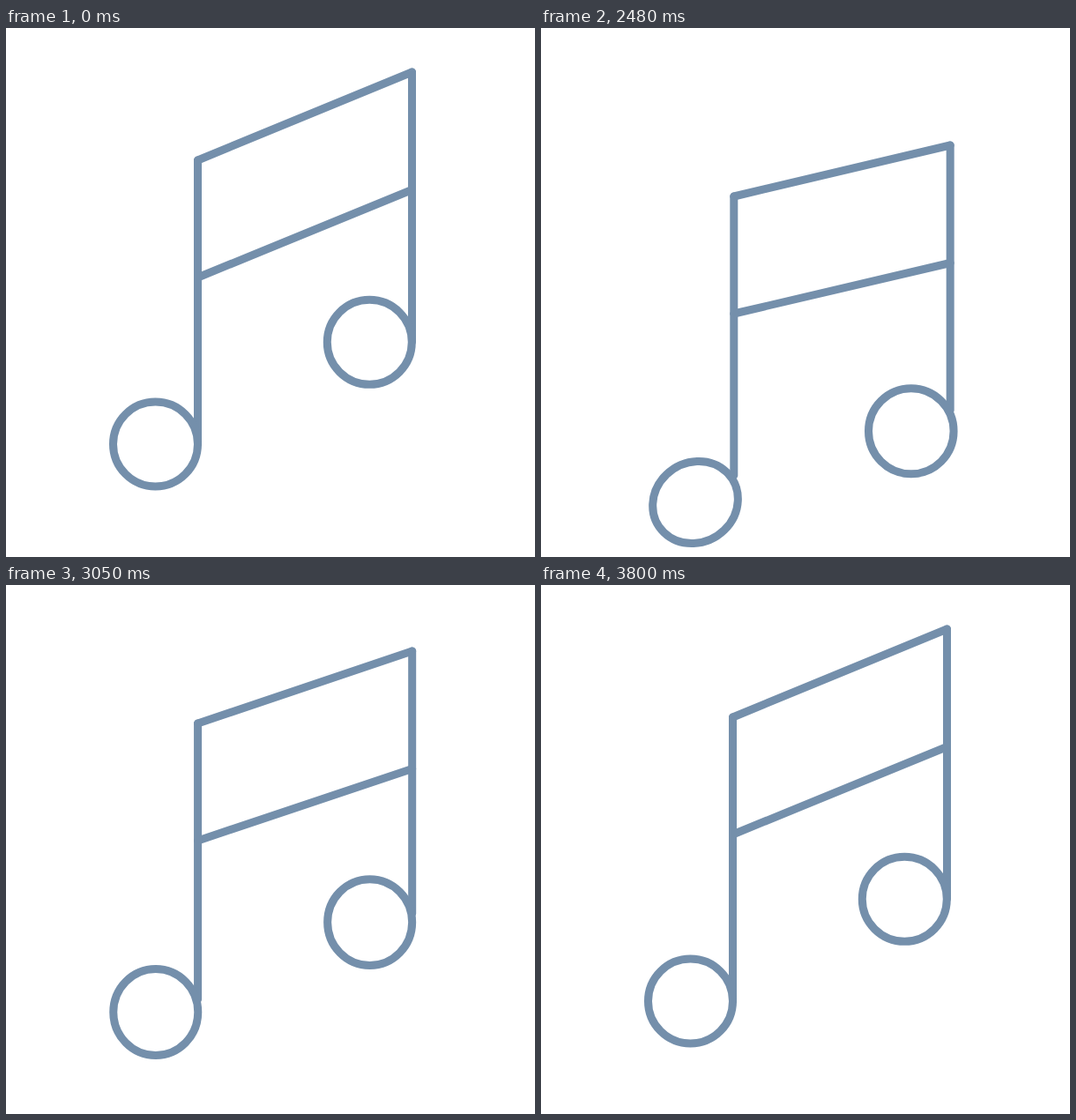
Animation, 600 px wide and 600 px high, one loop 3830 ms. Source, as an HTML page without scripts:

```html
<!DOCTYPE html>
<html lang="en">
<head>
<meta charset="utf-8">
<title>Bouncing note</title>
<style>
/* offsets of the left and right stems, stem length */
@property --l { syntax: "<number>"; inherits: true; initial-value: 0 }
@property --r { syntax: "<number>"; inherits: true; initial-value: 0 }
@property --len { syntax: "<number>"; inherits: true; initial-value: 1 }
/* heads: drop, sideways drift, tilt, width and height */
@property --dl { syntax: "<number>"; inherits: true; initial-value: 0 }
@property --dr { syntax: "<number>"; inherits: true; initial-value: 0 }
@property --x { syntax: "<number>"; inherits: true; initial-value: 0 }
@property --tl { syntax: "<number>"; inherits: true; initial-value: 0 }
@property --tr { syntax: "<number>"; inherits: true; initial-value: 0 }
@property --w { syntax: "<number>"; inherits: true; initial-value: 1 }
@property --hl { syntax: "<number>"; inherits: true; initial-value: 1 }
@property --hr { syntax: "<number>"; inherits: true; initial-value: 1 }

html, body { margin: 0; width: 100%; height: 100%; overflow: hidden; background: #fff }
svg {
  display: block; width: 100%; height: 100%;
  fill: none; stroke: #748fab; stroke-width: 9;
  stroke-linecap: round; stroke-linejoin: round;
  animation: bounce 3830ms linear infinite;
}
path, circle { vector-effect: non-scaling-stroke }

.frame {
  transform-origin: 217.5px 0;
  transform: matrix(calc(1 + var(--x) * .0015), calc((var(--r) - var(--l)) / 243), 0, 1, calc(var(--x) * .2), var(--l));
}
.stem { transform: scaleY(var(--len)) }
.stem.left { transform-origin: 217.5px 150px }
.stem.right { transform-origin: 460.5px 50px }
.head.left {
  transform-origin: 169.5px 472px;
  transform: matrix(var(--w), var(--tl), var(--tl), var(--hl), calc(var(--x) * .85), var(--dl));
}
.head.right {
  transform-origin: 412.3px 356.3px;
  transform: matrix(var(--w), var(--tr), var(--tr), var(--hr), calc(var(--x) * 1.15), var(--dr));
}

/* every step lasts 30 ms */
@keyframes bounce {
  0%, 52.99% { --l: 0; --r: 0; --len: 1; --dl: 0; --dr: 0; --x: 0; --tl: 0; --tr: 0; --w: 1; --hl: 1; --hr: 1 }
  /* crouch */
  53% { --l: 2.5; --r: 4.5; --len: 1; --dl: 2.5; --dr: 4.3; --x: 0; --tl: 0; --tr: 0; --w: 1; --hl: 1; --hr: 1.01; animation-timing-function: steps(6) }
  57.7% { --l: 25; --r: 50; --len: 1; --dl: 31; --dr: 57; --x: 2.5; --tl: -.01; --tr: 0; --w: 1; --hl: 1.01; --hr: 1.01; animation-timing-function: steps(6) }
  62.4% { --l: 46; --r: 92; --len: .99; --dl: 72; --dr: 112; --x: 6; --tl: -.025; --tr: 0; --w: 1; --hl: 1; --hr: 1.01; animation-timing-function: steps(3) }
  /* leap */
  64.75% { --l: 41; --r: 83; --len: .982; --dl: 66; --dr: 101; --x: 6.5; --tl: -.04; --tr: 0; --w: 1.006; --hl: .97; --hr: 1.01; animation-timing-function: steps(2) }
  66.31% { --l: 21; --r: 60; --len: .985; --dl: 49; --dr: 77; --x: 5; --tl: -.04; --tr: -.01; --w: 1; --hl: .97; --hr: 1; animation-timing-function: steps(3) }
  68.66% { --l: -20; --r: 10; --len: .97; --dl: -8; --dr: 10; --x: 2; --tl: 0; --tr: 0; --w: 1.01; --hl: .98; --hr: .98; animation-timing-function: steps(3) }
  71.01% { --l: -55; --r: -35; --len: .94; --dl: -60; --dr: -57; --x: 0; --tl: .03; --tr: .03; --w: 1.06; --hl: .93; --hr: .93; animation-timing-function: steps(3) }
  /* fall */
  73.36% { --l: -40; --r: -20; --len: .937; --dl: -46; --dr: -43.7; --x: 1.75; --tl: .045; --tr: .045; --w: 1.03; --hl: .948; --hr: .948; animation-timing-function: steps(4) }
  76.5% { --l: -16; --r: 3; --len: .95; --dl: -18; --dr: -10; --x: 1; --tl: .03; --tr: .03; --w: 1.01; --hl: .98; --hr: .98; animation-timing-function: steps(4) }
  79.63% { --l: 7; --r: 25; --len: .972; --dl: 12.5; --dr: 26.3; --x: .3; --tl: 0; --tr: 0; --w: 1; --hl: 1.02; --hr: 1.02; animation-timing-function: steps(1) }
  80.41% { --l: 10; --r: 28; --len: .972; --dl: 17; --dr: 31; --x: .5; --tl: -.01; --tr: -.01; --w: 1; --hl: 1.02; --hr: 1.02; animation-timing-function: steps(5) }
  /* settle */
  84.33% { --l: -2; --r: 8; --len: .985; --dl: 6; --dr: 14; --x: 1.2; --tl: -.02; --tr: -.02; --w: 1.01; --hl: 1; --hr: 1; animation-timing-function: steps(5) }
  88.25% { --l: -15; --r: -14; --len: 1; --dl: -11; --dr: -13; --x: .5; --tl: 0; --tr: 0; --w: 1; --hl: .99; --hr: .99; animation-timing-function: steps(3) }
  90.6% { --l: -10; --r: -10; --len: 1; --dl: -6.5; --dr: -9.7; --x: .3; --tl: 0; --tr: 0; --w: 1; --hl: 1; --hr: 1; animation-timing-function: steps(5) }
  94.51% { --l: -1; --r: -1; --len: 1; --dl: -.5; --dr: -1; --x: 0; --tl: 0; --tr: 0; --w: 1; --hl: 1; --hr: 1; animation-timing-function: steps(6) }
  99.21%, 100% { --l: 0; --r: 0; --len: 1; --dl: 0; --dr: 0; --x: 0; --tl: 0; --tr: 0; --w: 1; --hl: 1; --hr: 1 }
}
</style>
</head>
<body>
<svg viewBox="0 0 600 600">
  <g class="frame">
    <path d="M217.5 150L460.5 50M217.5 283L460.5 183.5"/>
    <path class="stem left" d="M217.5 150V472"/>
    <path class="stem right" d="M460.5 50V356"/>
  </g>
  <circle class="head left" cx="169.5" cy="472" r="48"/>
  <circle class="head right" cx="412.3" cy="356.3" r="48"/>
</svg>
</body>
</html>
```
